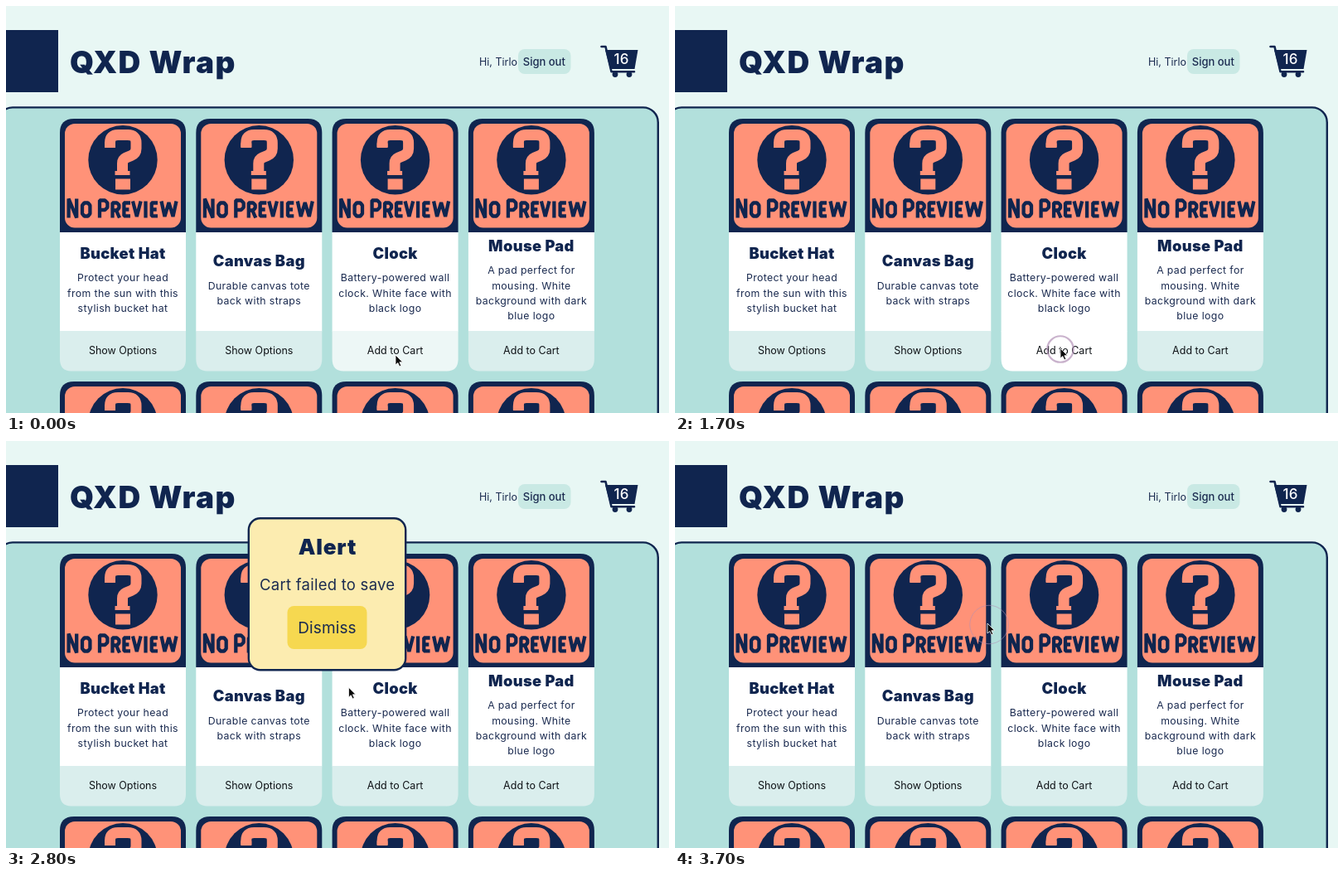
These frames come from a looping animation (800 by 491 pixels, 3.8 s). An HTML page:

```html
<!DOCTYPE html>
<html lang="en">
<head>
<meta charset="utf-8">
<title>Shop cart alert</title>
<style>
  html, body { margin: 0; width: 100%; height: 100%; overflow: hidden; background: #e8f7f4; }
  svg { display: block; width: 100vw; height: 100vh; }
  text { font: 400 12.5px Inter, "Open Sans", sans-serif; fill: #1b2b50; }
  .mid { text-anchor: middle; }
  .name { font-weight: 900; font-size: 18.3px; letter-spacing: .35px; fill: #10254f; }
  .note { font-size: 12.3px; letter-spacing: .38px; }
  .act { fill: #101418; }
  .navy { fill: #10254f; }
  .coral { fill: #ff9278; }
</style>
</head>
<body>
<svg id="stage" viewBox="0 0 800 491">
  <defs>
    <g id="preview" role="img" aria-label="No Preview">
      <path class="navy" d="M0 137V17Q0 0 17 0H135Q152 0 152 17V137Z"/>
      <rect class="coral" x="6" y="6" width="140" height="125.5" rx="12"/>
      <circle class="navy" cx="76" cy="49.7" r="41.7"/>
      <g fill="none" stroke="#ff9278" stroke-width="13">
        <path d="M60.5 34V29Q60.5 19.5 70 19.5H82Q92 19.5 92 29V36Q92 42 86 44.5L80 47Q75.5 49 75.5 54V67"/>
        <path d="M67 79H85"/>
      </g>
      <path class="coral" d="M54 29.5H67V35H54ZM66.5 63H84.5V68H66.5Z"/>
      <path fill="none" stroke="#10254f" stroke-width="4.3" stroke-linejoin="bevel" d="
        M10.6 119.5V96.5L20.2 119.5V96.5
        M27 104.5l2.5-3h4.4l2.5 3v10l-2.5 3h-4.4l-2.5-3z
        M48 119.5V98.5h6.4l3 3v5.5l-3 3h-6.4
        M63.5 119.5V101.5h5.4l2.5 2.5v3.5l-2.5 3h-5.4M68 110.5l4 9
        M85 101.5h-7.6v15.8h7.6M77.4 109.5h6
        M88 99.5l4.8 18.5 4.8-18.5
        M103.5 99.5v20
        M118 101.5h-7.3v15.8h7.3M110.7 109.5h6
        M122.5 99.5l4 18.5 5-17 5 17 4-18.5"/>
    </g>
  </defs>

  <rect width="800" height="491" fill="#e8f7f4"/>
  <rect class="navy" x="-12" y="29" width="75" height="75"/>
  <text x="77" y="80.5" style="font-weight:900;font-size:37px;letter-spacing:1.4px" class="navy">QXD Wrap</text>
  <text x="571" y="71.5">Hi, Tirlo</text>
  <rect x="618" y="52" width="63.5" height="30" rx="8" fill="#c9e9e4"/>
  <text class="mid" x="649.3" y="71.5" style="font-weight:500;font-size:13px">Sign out</text>

  <g class="navy">
    <path d="M723 53H762.5L758.5 76H729Z"/>
    <path d="M718.5 49H723.5L730.5 79.2H758" fill="none" stroke="#10254f" stroke-width="2.6" stroke-linecap="round" stroke-linejoin="round"/>
    <circle cx="735" cy="82.5" r="3.4"/>
    <circle cx="752" cy="82.5" r="3.4"/>
  </g>
  <text class="mid" x="742.5" y="70.3" style="fill:#fff;font-size:17px;font-weight:500">16</text>

  <rect x="-10" y="122.4" width="796.8" height="420" rx="18" fill="#b2e0dc" stroke="#10254f" stroke-width="2.4"/>
  <g id="cards"></g>

  <g id="alert">
    <rect x="292.8" y="93.2" width="189.4" height="183" rx="14" fill="#fcecb0" stroke="#10254f" stroke-width="2.4"/>
    <text class="mid navy" x="388" y="136.5" style="font-weight:900;font-size:26px;letter-spacing:.8px">Alert</text>
    <text class="mid" x="387.7" y="180" style="font-size:18.5px;letter-spacing:.25px">Cart failed to save</text>
    <rect id="dismiss" x="339.5" y="199" width="96" height="52" rx="8"/>
    <text class="mid" x="387.5" y="231.8" style="font-size:19px;letter-spacing:.1px">Dismiss</text>
  </g>

  <circle id="ring" fill="none"/>
  <path id="cursor" d="M0 0V12L2.8 9.5L4.8 13.8L6.8 12.9L4.9 8.7H8.6Z" fill="#0a0a0a" stroke="#fff" stroke-width=".8"/>
</svg>
<script>
const LOOP = 3800, STEP = 100;
const el = id => document.getElementById(id);

const items = [
  { name: "Bucket Hat", y: 305, act: "Show Options",
    lines: ["Protect your head", "from the sun with this", "stylish bucket hat"] },
  { name: "Canvas Bag", y: 314.3, act: "Show Options",
    lines: ["Durable canvas tote", "back with straps"] },
  { name: "Clock", y: 305, act: "Add to Cart",
    lines: ["Battery-powered wall", "clock. White face with", "black logo"] },
  { name: "Mouse Pad", y: 296, act: "Add to Cart",
    lines: ["A pad perfect for", "mousing. White", "background with dark", "blue logo"] }
];

const label = (cls, y, s) => `<text class="mid ${cls}" x="76" y="${y}">${s}</text>`;

el("cards").innerHTML = items.map((it, i) => `
  <g transform="translate(${65 + i * 164.3} 0)">
    <use href="#preview" y="136"/>
    <rect y="273" width="152" height="119.5" fill="#fff"/>
    <path id="btn${i}" d="M0 392H152V426Q152 440.5 138 440.5H14Q0 440.5 0 426Z" fill="#daeeed"/>
    ${label("name", it.y, it.name)}
    ${it.lines.map((s, n) => label("note", it.y + 27.3 + n * 18.2, s)).join("")}
    ${label("act", 420.3, it.act)}
    <use href="#preview" y="453"/>
  </g>`).join("");

// [time, x, y] of the pointer tip
const path = [[0, 470, 421], [300, 470, 421], [900, 465, 413], [2400, 465, 413],
  [3100, 380, 222], [3300, 380, 222], [3500, 377, 220], [LOOP, 377, 220]];
// [start, x, y] of each click ring
const clicks = [[1600, 465, 414], [3400, 379, 221.5]];

const ease = p => p * p * (3 - 2 * p);
const set = (node, attrs) => { for (const k in attrs) node.setAttribute(k, attrs[k]); };

function pointer(t) {
  const i = path.findIndex(k => k[0] > t);
  const [t0, x0, y0] = path[i - 1], [t1, x1, y1] = path[i];
  const p = ease((t - t0) / (t1 - t0));
  return [x0 + (x1 - x0) * p, y0 + (y1 - y0) * p];
}

function draw(t) {
  const [x, y] = pointer(t);
  set(el("cursor"), { transform: `translate(${x} ${y})` });

  const pressed = t >= 1600 && t < 1800;
  set(el("btn2"), { fill: pressed ? "#fff" : y > 392 ? "#edf7f6" : "#daeeed" });

  const shown = t >= 1900 && t < 3600;
  const over = x > 339 && x < 436 && y > 199 && y < 251;
  set(el("alert"), { visibility: shown ? "visible" : "hidden" });
  set(el("dismiss"), { fill: over ? "#e8cb4d" : "#f6d850" });

  const hit = clicks.find(c => t >= c[0] && t < c[0] + 400);
  if (hit) {
    const p = (t - hit[0]) / 400;
    set(el("ring"), { cx: hit[1], cy: hit[2], r: 12 + 15 * p, stroke: "#b08fb5",
      "stroke-width": 2.8 - 2.4 * p, opacity: 0.75 - 0.25 * p });
  } else set(el("ring"), { opacity: 0 });
}

const start = performance.now();
function tick() {
  const t = (performance.now() - start) % LOOP;
  draw(Math.floor(t / STEP) * STEP);
  requestAnimationFrame(tick);
}
tick();
</script>
</body>
</html>
```
